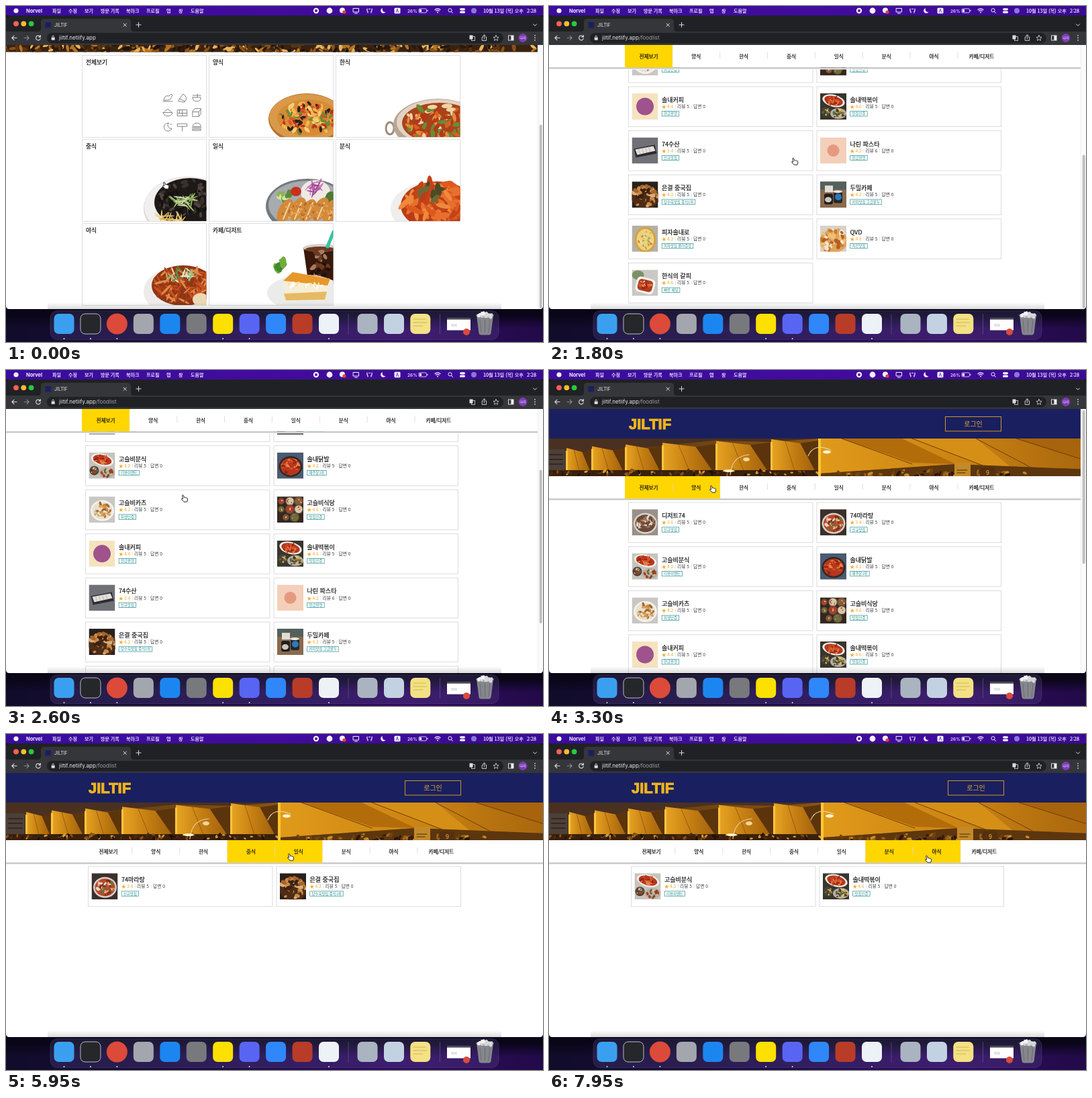
An HTML page for the animation above (8000 ms loop, 800 by 500 pixels).

```html
<!DOCTYPE html>
<html lang="ko">
<head>
<meta charset="utf-8">
<title>JILTIF</title>
<style>
html, body { margin: 0; width: 100%; height: 100%; overflow: hidden; background: #0e0a26; }
#stage { display: block; width: 800px; height: 500px; }
text { font-family: "Noto Sans CJK KR", "Noto Sans CJK JP", "Noto Sans CJK", sans-serif; white-space: pre; }
.ui { font-family: Inter, "Noto Sans CJK KR", "Noto Sans CJK JP", sans-serif; }
.logo { font-family: "Liberation Sans", Arial, sans-serif; font-weight: 700; }
.mid { text-anchor: middle; }
.med { font-weight: 500; }
</style>
</head>
<body>
<svg id="stage" viewBox="0 0 800 500"></svg>
<script>
const LOOP = 8000, TICK = 50;
const TOP = 58, VIEW = 393, TAB_W = 70.85, NAV_H = 33.5;

// Markup helpers
const rect = (x, y, w, h, fill, more = '') =>
  `<rect x="${x}" y="${y}" width="${w}" height="${h}" fill="${fill}" ${more}/>`;
const oval = (x, y, rx, ry, fill, more = '') =>
  `<ellipse cx="${x}" cy="${y}" rx="${rx}" ry="${ry}" fill="${fill}" ${more}/>`;
const path = (d, fill, more = '') => `<path d="${d}" fill="${fill}" ${more}/>`;
const line = (d, color, w = 1) =>
  path(d, 'none', `stroke="${color}" stroke-width="${w}" stroke-linecap="round" stroke-linejoin="round"`);
const text = (x, y, s, size, fill, more = '') =>
  `<text x="${x}" y="${y}" font-size="${size}" fill="${fill}" ${more}>${s}</text>`;
// Slightly heavier label
const label = (x, y, s, size, fill, cls = '', more = '') =>
  text(x, y, s, size, fill, `class="med ${cls}" stroke="${fill}" stroke-width=".2" ${more}`);
const box = (x, y, w, h, body) =>
  `<svg x="${x}" y="${y}" width="${w}" height="${h}" overflow="hidden">${body}</svg>`;
const group = (id, body) => `<g id="${id}">${body}</g>`;
const fade = (id, stops, more = '') => `<linearGradient id="${id}" ${more}>` +
  stops.map((c, i) => `<stop offset="${i / (stops.length - 1)}" stop-color="${c}"/>`).join('') +
  '</linearGradient>';

const random = seed => () => (seed = (seed * 16807) % 2147483647) / 2147483647;

// Small rotated bits spread over an ellipse
function scatter(cx, cy, rx, ry, colors, n, len, wide, seed) {
  const rnd = random(seed * 7919 + 13);
  let out = '';
  for (let i = 0; i < n; i++) {
    const a = rnd() * 6.283, r = Math.sqrt(rnd());
    const x = (cx + Math.cos(a) * r * rx).toFixed(1), y = (cy + Math.sin(a) * r * ry).toFixed(1);
    const k = 0.6 + rnd() * 0.6;
    out += oval(x, y, (len * k).toFixed(1), (wide * k).toFixed(1), colors[i % colors.length],
      `transform="rotate(${Math.floor(rnd() * 180)} ${x} ${y})"`);
  }
  return out;
}

// Shop pictures, 39 by 39
const bowl = (bg, rim, food, seed) => rect(0, 0, 39, 39, bg) + oval(20, 21, 17.5, 15.5, rim) +
  oval(20, 21, 15, 13, food[0]) + scatter(20, 21, 13, 11, food, 40, 3.2, 1.5, seed);
const spread = (bg, rim, food, seed) => {
  let out = rect(0, 0, 39, 39, bg);
  for (let i = 0; i < 8; i++) {
    const x = 6 + (i % 3) * 13 + (i > 5 ? 7 : 0), y = 7 + Math.floor(i / 3) * 12;
    const r = i % 3 ? 7 : 5, c = food[i % food.length];
    out += oval(x, y, r, r, rim) + oval(x, y, r - 1.3, r - 1.3, c) + scatter(x, y, r - 3, r - 3, food, 6, 1.5, 0.8, seed + i);
  }
  return out;
};
const duo = (bg, a, b, seed) => rect(0, 0, 39, 39, bg) +
  oval(20, 11, 17, 9, '#f2eeea', 'transform="rotate(14 20 11)"') +
  oval(20, 11, 14, 7, a[0], 'transform="rotate(14 20 11)"') + scatter(20, 11, 11, 5, a, 22, 4, 1.2, seed) +
  oval(27, 30, 12, 8, '#b8aea4') + scatter(27, 30, 9, 6, b, 30, 2.4, 1.4, seed + 1) +
  oval(8, 27, 7, 7, '#4a4039') + scatter(8, 27, 5, 5, b, 14, 2, 1.2, seed + 2);
const heap = (bg, food, seed) => rect(0, 0, 39, 39, bg) + oval(20, 23, 21, 17, food[0]) +
  scatter(20, 22, 19, 16, food, 60, 4, 2.6, seed);
const mark = (bg, dot, r) => rect(0, 0, 39, 39, bg) + oval(19.5, 19.5, r, r, dot);
const fish = () => rect(0, 0, 39, 39, '#707176') + path('M3 17L34 11 37 24 6 30Z', '#2b2c30') +
  path('M5 18L32 13 35 20 8 26Z', '#e4dfda') + line('M10 18l2 6m3-8l2 7m3-8l2 7m3-8l2 7', '#b8aca4', 0.8);
const cups = () => rect(0, 0, 39, 39, '#8a6a4c') + rect(0, 0, 39, 12, '#54605c') +
  rect(7, 6, 12, 10, '#e2ddd2') + rect(6, 18, 13, 16, '#1d1f22', 'rx="3"') + rect(20, 15, 13, 17, '#24272b', 'rx="3"') +
  oval(12, 27, 5, 4, '#d0c7ba') + oval(27, 23, 5, 5, '#2f78bd') + oval(26, 15, 7, 2, '#e9e6df');

const red = ['#b8361c', '#d9572a', '#e8864a', '#8e2414'];
const mixed = ['#7a4a2c', '#d8c3a0', '#5c6a3a', '#b23c20'];
// name, score, reviews, tag, category, picture
const shops = [
  ['디저트74', '3.6', 5, '신규맛집', 7, bowl('#9a9088', '#d9d2cb', ['#6a4a3a', '#e6dacb', '#a8785a'], 2)],
  ['74마라탕', '3.4', 5, '신규맛집', 3, bowl('#3a302c', '#d8d0c8', ['#b8482a', '#e9a98a', '#5d7a34', '#e4d8c4', '#7a2c1a'], 3)],
  ['고슬비분식', '4.2', 5, '리뷰이벤트', 5, duo('#c6c3bc', red, mixed, 4)],
  ['솔내닭발', '4.2', 5, '재주문1위', 6, bowl('#4b5a70', '#2c2826', red, 5)],
  ['고슬비카츠', '4.2', 5, '위생인증', 4, bowl('#c9c7c3', '#f4f2ee', ['#e8e0d0', '#c98a42', '#a8662a', '#d8a45c'], 6)],
  ['고슬비식당', '4.6', 5, '맛집인증', 2, spread('#35261e', '#5d4a3e', ['#b43a20', '#d8c6a6', '#8a5a34', '#6a7038'], 7)],
  ['솔내커피', '4.4', 5, '현금환영', 7, mark('#f5e3bf', '#a0528c', 13)],
  ['솔내떡볶이', '4.6', 5, '맛집인증', 5, duo('#38362c', red, ['#5a4a34', '#e8c468', '#3c3428', '#5c7038', '#d8a84a'], 8)],
  ['74수산', '3.4', 5, '신규맛집', 4, fish()],
  ['나린 파스타', '4.2', 6, '현금환영', 1, mark('#f4cfba', '#e59a80', 9)],
  ['은결 중국집', '4.2', 5, '탕수육맛집 중식1위', 3, heap('#28201c', ['#4e2c16', '#a8642a', '#c98a48', '#3c2010', '#d8b078'], 9)],
  ['두밀카페', '4.2', 5, '커피맛집 고급원두', 7, cups()],
  ['피자솔내로', '4.2', 5, '피자맛집 콜라증정', 1, rect(0, 0, 39, 39, '#b4b0a8') + oval(20, 21, 16, 19, '#d6a042') +
    oval(20, 21, 13, 16, '#ecd27c') + scatter(20, 21, 11, 14, ['#a8b05a', '#f2e4a8', '#c9883a'], 30, 2, 1.2, 10)],
  ['QVD', '4.8', 5, '치킨맛집', 6, heap('#d9d0c6', ['#e0a45a', '#c87a30', '#efc07c', '#b45f24', '#f3e6d2'], 11)],
  ['한식의 갈피', '4.6', 5, '빠른 배달', 2, rect(0, 0, 39, 39, '#c9c8c2') + oval(9, 8, 9, 7, '#7d9068') +
    rect(6, 12, 28, 23, '#f6f4ef', 'rx="6" transform="rotate(14 20 23)"') +
    rect(9, 15, 22, 17, '#b23c1e', 'rx="5" transform="rotate(14 20 23)"') + scatter(20, 23, 9, 7, [...red, '#ead2b0'], 24, 2.6, 1.3, 12)],
];

const emWidth = s => [...s].reduce((w, c) => w + (c === ' ' ? 0.224 : c < '~' ? 0.555 : 0.92), 0);

function card([name, score, reviews, tag, , pic]) {
  const grey = '#3c3c3c';
  return '<g class="card">' + rect(0.5, 0.5, 274.5, 59.5, '#fff', 'stroke="#dcdcdc"') + box(5.5, 10.5, 39, 39, pic) +
    label(50, 23.5, name, 9, '#111') +
    text(49.7, 32.6, '★', 7, '#f9a825') + text(58, 32.6, score, 6.7, '#f9a825') +
    text(73, 32.6, `리뷰 ${reviews}`, 6.7, grey) + text(97, 32.6, '답변 0', 6.7, grey) +
    line('M70.5 27.5v5M94.3 27.5v5', '#d5d5d5', 0.6) +
    rect(50.2, 37.2, emWidth(tag) * 5.4 + 5.6, 7.3, '#fff', 'stroke="#2b8f92" stroke-width=".7"') +
    text(53, 42.9, tag, 5.4, '#2b8f92') + '</g>';
}

// Home page: eight tiles
const icons = ['M-7 5h14M-6 3q1-8 8-6l3-3 2 2-2 3q0 4-5 4z', 'M-6 4L1-6q5 2 5 8l-3 4zM-4 1l8 4', 'M-6-1h12q0 6-6 6t-6-6zM-6-4h12M1-6v5',
  'M-7 0h14q-1 5-7 5t-7-5zM-5-1q5-8 10 0', 'M-7-4h14v9h-14zM-7 1h14M0-4v9M-4-4v4', 'M-6-2l3-4h9v8l-3 4h-9zM-6-1h9v6M3-1l3-4',
  'M1-6a6 6 0 1 0 5 8a5 5 0 0 1-5-8zM4-4h2', 'M-7-5h14v4h-14zM0-1v7', 'M-6-1q0-5 6-5t6 5zM-7 1h14M-6 3h12v2h-12z'];
const dishes = {
  '전체보기': () => icons.map((d, i) =>
    `<g transform="translate(${127 + (i % 3) * 21.6} ${63 + Math.floor(i / 3) * 21.6})">${line(d, '#777', 0.9)}</g>`).join(''),
  '양식': () => oval(145, 94, 57, 38, '#b8742c') + oval(145, 92, 56, 35, '#d9994a') + oval(147, 92, 46, 27, '#d98a34') +
    scatter(147, 92, 43, 24, ['#c0301c', '#f2cf72', '#d9542a', '#2c2218', '#6f8a34', '#f0b850'], 120, 4.5, 2.2, 21),
  '한식': () => oval(80, 108, 6, 9, 'none', 'stroke="#a08c7c" stroke-width="3"') + oval(152, 103, 67, 39, '#b9a594') +
    oval(153, 99, 63, 34, '#e3d3c2') + oval(154, 100, 56, 30, '#a8431c') +
    scatter(154, 100, 50, 26, ['#d8601f', '#f0d3a4', '#b0381a', '#e58a3a', '#6c8a34'], 80, 7, 3, 22),
  '중식': () => oval(157, 102, 66, 47, '#d9d8d6') + oval(157, 100, 65, 44, '#f1f0ee') + oval(160, 93, 53, 36, '#1e1816') +
    scatter(160, 88, 48, 28, ['#38302c', '#15100f', '#4c443e'], 70, 5, 2.5, 23) +
    scatter(130, 117, 24, 7, ['#d8b45c', '#efd58a'], 24, 9, 1, 24) +
    scatter(152, 92, 17, 9, ['#a9c77a', '#d5e2ae', '#7fa350'], 26, 9, 1, 25),
  '일식': () => oval(146, 99, 62, 41, '#74797e') + oval(146, 97, 58, 36, '#a7abae') + oval(158, 78, 22, 18, '#efe9e2') +
    scatter(112, 85, 11, 8, ['#8db552', '#d3e2a4', '#5d8a3a'], 9, 6, 4, 26) + oval(129, 77, 8, 7, '#c8301f') +
    scatter(158, 70, 13, 9, ['#a03f92', '#c778b8'], 22, 8, 0.9, 27) + oval(181, 90, 9, 13, '#4d7a34') +
    [0, 1, 2, 3, 4].map(i => oval(113 + i * 17, 106 - (i % 2) * 3, 10, 19, '#d3893a', `transform="rotate(28 ${113 + i * 17} 106)"`) +
      line(`M${120 + i * 17} 94l-10 24`, '#f2d39a', 2)).join('') + scatter(147, 107, 42, 13, ['#b8692a', '#e6ab58'], 60, 2.4, 1.3, 28),
  '분식': () => oval(148, 103, 67, 41, '#efeeec') + oval(151, 98, 55, 36, '#b93c16') +
    scatter(150, 94, 48, 27, ['#dd5a1e', '#ef8a3c', '#c3421a', '#e8702c'], 58, 13, 4, 29) +
    scatter(146, 78, 24, 12, ['#4a4a26', '#6c6a34'], 7, 9, 4, 30),
  '야식': () => oval(150, 101, 59, 38, '#eeecea') + oval(150, 92, 47, 30, '#8e3616') +
    scatter(150, 91, 42, 25, ['#c8521f', '#a83c18', '#e08a44'], 80, 9, 1.6, 31) +
    scatter(148, 76, 19, 9, ['#9fb878', '#e6ead0', '#5f8a42'], 26, 8, 1.1, 32) +
    oval(176, 113, 12, 10, '#ecd9b4'),
  '카페/디저트': () => path('M140 35H190L184 92H148Z', '#38180c') + oval(165, 36, 25, 6, '#d5cfca') + oval(165, 38, 22, 4, '#6c3a20') +
    scatter(164, 62, 15, 20, ['#6c3a22', '#20100a', '#a87a60'], 24, 5, 3, 33) + line('M176 34l9-22', '#35c4a0', 5) +
    oval(143, 103, 57, 27, '#ebebe9') + path('M110 85L124 72 180 82 173 111 114 114Z', '#f7eed8') +
    path('M110 85L124 72 180 82 176 92Z', '#e8982a') + path('M111 104L175 101 172 113 114 114Z', '#e6ba62') +
    scatter(142, 92, 28, 4, ['#fffaf0', '#f4e3b8'], 16, 4, 2, 34) +
    scatter(105, 62, 9, 7, ['#3f8a2c', '#6fae3c', '#2c6e24'], 8, 8, 4, 35),
};
const labels = ['전체보기', '양식', '한식', '중식', '일식', '분식', '야식', '카페/디저트'];

const home = () => rect(0, TOP, 800, VIEW, '#fff') +
  box(0, TOP, 800, 10.5, rect(0, 0, 800, 11, '#3a220f') +
    scatter(400, 5, 420, 7, ['#8a5216', '#1f120a', '#b8741e', '#5c3410', '#e8b45c', '#2a180c'], 260, 6, 2.4, 41)) +
  labels.map((name, i) => {
    const x = 113 + (i % 3) * 189, y = 74 + Math.floor(i / 3) * 125;
    return rect(x + 0.5, y - 0.5, 185, 122, '#fff', 'stroke="#dedede"') + box(x + 1, y, 184.5, 121, dishes[name]()) +
      label(x + 6, y + 13.3, name, 8.7, '#111');
  }).join('');

// Banner of lit tents
function banner() {
  const posts = [30, 68, 118, 173, 253, 335, 405];
  const sails = posts.slice(0, -1).map((x, i) => {
    const w = posts[i + 1] - x, y = 14 - i * 2.6;
    return path(`M${x} ${y}L${x + w * 0.62} ${y + 6}L${x + w * 0.95} 50H${x}Z`, 'url(#sail)') +
      path(`M${x + w * 0.62} ${y + 6}L${x + w} ${y + 2}V50H${x + w * 0.95}Z`, '#5c340c') +
      line(`M${x + w * 0.3} ${y + 3}L${x + w * 0.5} 48`, '#8a5410', 0.8) + rect(x - 1, y + 4, 3, 46 - y, '#ffc440');
  }).join('');
  return box(-4, 102, 808, 56, rect(0, 0, 808, 56, 'url(#tent)') +
    path('M0 0H405L335 5 250 3 120 16 0 22Z', '#4a3020') + rect(0, 16, 28, 40, '#4c4038') +
    line('M4 24h20M4 31h20M4 38h20', '#332821', 2) + sails +
    rect(0, 47, 405, 9, '#3a200c') + scatter(200, 51, 210, 4, ['#1e1008', '#8a5016', '#d89a34', '#4a2c0e'], 90, 3, 1.6, 51) +
    path('M408 0H808V46L610 38 408 52Z', 'url(#canopy)') + path('M440 0L545 36 610 38 530 0Z', '#b36c0a') +
    path('M545 0L650 40 690 41 640 0Z', '#d68f16') + path('M700 0L808 34V0Z', '#a8640c') +
    line('M440 0l105 38M545 0l105 40M640 0l80 42M700 0l108 34', '#6c3e0a', 1) +
    path('M408 52L610 38 808 46V56H408Z', '#5c360e') +
    scatter(570, 52, 150, 4, ['#2c1608', '#9a6218', '#70420e', '#c88a2c'], 70, 4, 2, 52) +
    rect(405, 0, 4, 56, '#ffc632') + line('M274 54Q276 26 302 24M390 26Q398 6 424 17', '#e6cf9e', 1.2) +
    oval(272, 48, 8, 2, '#fff0c0') + oval(298, 31, 5, 3, '#f2d596') + oval(418, 20, 6, 2.5, '#fff3cc') +
    rect(608, 36, 24, 20, '#c48a28') + line('M612 47h15M612 51h12', '#4a2c0c', 1.2) + rect(646, 43, 22, 13, '#54300e') +
    text(655, 54, '9', 9, '#f0bd48'));
}

const listPage = () => rect(0, TOP, 800, VIEW, '#fff') +
  group('body', rect(-8, TOP, 816, 44, '#1a1f5f') +
    text(119, 88, 'JILTIF', 22, '#efb41c', 'class="logo" stroke="#efb41c" stroke-width="1"') +
    rect(590.5, 69.5, 83, 21.5, 'none', 'stroke="#c8982a"') +
    text(632, 83.8, '로그인', 10, '#e0aa2c', 'class="mid med"') + banner() + shops.map(card).join('')) +
  group('nav', rect(-8, 0, 816, NAV_H, '#fff') + rect(-8, NAV_H, 816, 3, 'url(#shade)') +
    labels.map((s, i) => rect(113 + i * TAB_W, 0, TAB_W + 0.2, NAV_H, '#ffd600', 'class="hot"')).join('') +
    labels.map((s, i) => (i ? line(`M${113 + i * TAB_W} 11v9`, '#d8d8d8', 0.8) : '') +
      label(113 + (i + 0.5) * TAB_W, 20.3, s, 7.6, '#111', 'mid')).join(''));

// Desktop, window frame and dock
const menu = () => {
  const items = [['파일', 69], ['수정', 93], ['보기', 117], ['방문 기록', 141], ['북마크', 179], ['프로필', 209], ['탭', 239], ['창', 257], ['도움말', 275]];
  const w = '#f4f0ff';
  return rect(0, 0, 800, 14, 'url(#bar)') + oval(15, 7, 3.6, 3.6, w) +
    text(30, 9.6, 'Norvel', 7.4, w, 'class="ui" font-weight="700"') +
    items.map(([s, x]) => label(x, 9.5, s, 7, w)).join('') +
    oval(462, 7, 4.2, 4.2, w) + rect(460.3, 5.3, 3.4, 3.4, '#40109c') + oval(482, 7, 4.4, 4.4, w) +
    oval(501, 6.5, 4, 4, w) + oval(504, 9, 2.6, 2.6, '#e0412f') +
    line('M517.5 3.5h8v5.5h-8zM519.5 11h4', w, 1) + line('M538 4v3q0 1 1 1v2M545 4v3q0 1-1 1v2M540.5 4.5h2', w, 1.2) +
    path('M561 3a4 4 0 1 0 4.5 6a4.2 4.2 0 0 1-4.5-6z', w) + rect(578.5, 2.8, 9, 8.4, w, 'rx="1.5"') +
    text(583, 9.6, 'A', 7, '#40109c', 'class="ui mid"') + text(598, 9.5, '26%', 6.6, w, 'class="ui med"') +
    rect(615, 4, 11.5, 6, 'none', `rx="1.6" stroke="${w}" stroke-width=".8"`) + rect(616, 5, 3, 4, w) + rect(627.4, 5.8, 1, 2.4, w) +
    line('M639 5.5q4-3.4 8 0M640.6 7.4q2.4-2 4.8 0', w, 1.2) + oval(643, 9.5, 1, 1, w) +
    oval(661.5, 6.3, 2.6, 2.6, 'none', `stroke="${w}"`) + line('M663.5 8.5l2 2', w) +
    rect(676, 3.2, 8, 3.2, w, 'rx="1.6"') + rect(676, 7.6, 8, 3.2, w, 'rx="1.6"') + oval(697, 7, 4, 4, '#8a78d8') +
    label(711, 9.6, '10월 13일 (목) 오후', 7.2, w) + label(790, 9.6, '2:28', 7.2, w, '', 'text-anchor="end"');
};

const frame = () => {
  const g = '#dadce0';
  return path(`M0 ${TOP}V19q0-5 5-5H795q5 0 5 5V${TOP}Z`, '#202124') +
    path('M47 38q5 0 5-4V24q0-5 5-5H181q5 0 5 5v10q0 4 5 4z', '#35363a') + rect(0, 38, 800, 20, '#35363a') +
    ['#ff5f57', '#febc2e', '#28c840'].map((c, i) => oval(15 + i * 11.3, 26.3, 3.9, 3.9, c)).join('') +
    rect(58.5, 24, 8.5, 8.5, '#1b1f60') + text(72, 30.8, 'JILTIF', 7, '#e8eaed', 'class="ui"') +
    line('M175 26l4.4 4.4M179.4 26l-4.4 4.4M194 28h7M197.5 24.5v7M785.5 27l2.5 2.5 2.5-2.5', g) +
    rect(61, 40, 680, 15.4, '#202124', 'rx="7.7"') +
    line('M16 47.5h-7M12 44.3l-3.2 3.2 3.2 3.2', g, 1.1) + line('M27 47.5h7M31 44.3l3.2 3.2-3.2 3.2', '#85878b', 1.1) +
    line('M51 45.8a3.4 3.4 0 1 0 .3 2.6M51.4 43.5v2.6h-2.6', g, 1.1) +
    rect(67.7, 46.8, 5, 4, g, 'rx=".6"') + line('M68.9 46.5v-1a1.3 1.3 0 0 1 2.6 0v1', g, 0.9) +
    `<text class="ui" x="79" y="50.4" font-size="8" fill="#e8eaed">jiltif.netlify.app<tspan id="route" fill="#9aa0a6">/foodlist</tspan></text>` +
    rect(690.5, 43.5, 5, 6, g) + rect(693.5, 45.5, 5, 6, 'none', `stroke="${g}" stroke-width=".8"`) +
    line('M710.5 46h-1.3v5.4h6.4v-5.4h-1.3M712.4 49v-6M710.6 44.6l1.8-1.8 1.8 1.8', g, 0.9) +
    line('M730 43.5l1.2 2.7 2.9.3-2.2 2 .6 2.9-2.5-1.5-2.5 1.5.6-2.9-2.2-2 2.9-.3z', g, 0.8) +
    rect(748.5, 44, 7.5, 7, 'none', `stroke="${g}"`) + rect(752.5, 44, 3.5, 7, '#fff') +
    oval(770, 47.5, 6.4, 6.4, '#7d3bb8') + text(770, 49.3, '나라', 4.8, '#fff', 'class="mid"') +
    [43.8, 47.3, 50.8].map(y => oval(788, y, 0.9, 0.9, g)).join('');
};

const desk = () => rect(0, 440, 800, 60, 'url(#desk)') +
  rect(0, 440, 800, 40, 'url(#under)');

const dock = () => {
  const apps = ['#3b9ff0', '#25272a', '', '#a3a6ad', '#1c86f0', '#77797d', '#fbe000', '#5865f2', '#2f87fa', '#b83c28', '#edf2f7'];
  const at = i => 86.5 + i * 39.45;
  const tile = (x, c, more = '') => rect(x - 15, 458, 30, 30, c, `rx="7" ${more}`);
  return rect(66, 453.5, 668, 43, '#6a5aa8', 'rx="10" fill-opacity=".22" stroke="#9c8cd0" stroke-opacity=".25" stroke-width=".7"') +
    apps.map((c, i) => c ? tile(at(i), c, i === 1 ? 'stroke="#b8bac0" stroke-width="1"' : '') :
      oval(at(i), 473, 15.5, 15.5, '#dc4a3a')).join('') +
    [0, 1, 2, 6, 7, 10].map(i => oval(at(i), 495, 1, 1, '#e6e0f4')).join('') +
    line('M510 459v29M646.5 459v29', '#64548f', 0.7) + tile(538.5, '#aab4c0') + tile(578, '#c3d2e2') + tile(617.3, '#f3e184') +
    line('M607 466h18M607 471h20M607 476h14', '#c9b24c', 0.9) +
    rect(657, 464.5, 35, 18, '#fff') + rect(657, 464.5, 35, 2, '#35363a') + rect(663, 473, 9, 4, '#e4e4e8') + oval(686, 485, 5, 5, '#dc4a3a') +
    path('M701 460H726L722.5 487q-.3 2.4-3 2.4h-12q-2.7 0-3-2.4z', '#85878d') +
    oval(713.5, 460.5, 13, 3.4, '#b4b6ba') + scatter(713.5, 460, 10, 3, ['#f4f4f4', '#d6d8da'], 12, 4, 2.4, 61) +
    line('M706 467l2 19M713.5 467v19M721 467l-2 19', '#64666c', 0.8);
};

const hand = 'M-3.4-4.3q.7-1.5 1.7-.2l1.3 3.3q1-.7 1.7.1 1-.5 1.6.4 1.3-.2 1.6 1.2.5 2.4-.8 4.7h-4.7l-3.3-3.5q-.6-1.5 1-1.3l1 .6z';

document.getElementById('stage').innerHTML = '<defs>' +
  fade('bar', ['#3a0ca0', '#420c9e', '#3a0a94']) + fade('desk', ['#110c2a', '#180c38', '#220d4c', '#320b5e', '#220a48']) +
  fade('tent', ['#3a2a22', '#6a4214', '#8a5512', '#a8680e', '#7a4a10']) +
  fade('sail', ['#e8a423', '#c47e12', '#a0600e']) + fade('canopy', ['#e09a1a', '#cc8412', '#a8660e']) +
  fade('shade', ['#a8a8a8', '#fff'], 'x2="0" y2="1"') +
  fade('under', ['#0a0618', '#0a0618', '#0a061800'], 'x2="0" y2="1"') +
  fade('glow', ['#00000000', '#00000024'], 'x2="0" y2="1"') +
  `<clipPath id="page"><path d="M0 ${TOP}H800V446q0 5-5 5H5q-5 0-5-5Z"/></clipPath></defs>` +
  rect(0, 0, 800, 500, '#12092e') + menu() + desk() + frame() +
  `<g clip-path="url(#page)">` + group('home', home()) + group('list', listPage()) +
  group('bar-v', rect(792, TOP, 8, VIEW, '#fafafa') + line('M792.3 58v393', '#e6e6e6', 0.6) +
    rect(794.7, 0, 4, 10, '#bfbfbf', 'rx="2" id="thumb"')) + rect(62, 441, 676, 10, 'url(#glow)') + '</g>' + dock() +
  group('hand', path(hand, '#fff', 'stroke="#111" stroke-width=".9" stroke-linejoin="round"'));

// Timeline
const pages = [[0, -1], [600, 0], [3650, 1], [4650, 2], [5500, 3], [6200, 4], [7000, 5]];
const scrolls = [[0, 165.5], [1000, 165.5], [1400, 274], [2250, 274], [2500, 183.5], [3050, 0]];
const moves = [[0, 238, 267], [50, 238, 267], [400, 240, 150], [600, 240, 150], [950, 433, 258], [1500, 433, 258],
  [2250, 266, 191], [3100, 266, 191], [3300, 244, 177], [4000, 244, 177], [4350, 299, 179], [5000, 299, 179],
  [5400, 365, 181], [5800, 375, 181], [5950, 424, 183], [6050, 438, 183], [6650, 438, 183], [6850, 506, 184],
  [7800, 506, 184], [7950, 565, 186]];

function valueAt(keys, t, col) {
  const i = keys.findIndex(k => k[0] > t);
  if (i < 0) return keys[keys.length - 1][col];
  const a = keys[i - 1], b = keys[i];
  return a[col] + (b[col] - a[col]) * (t - a[0]) / (b[0] - a[0]);
}

const $ = id => document.getElementById(id);
const cards = [...document.querySelectorAll('.card')];
const hots = [...document.querySelectorAll('.hot')];
const show = (el, on) => el.setAttribute('display', on ? 'inline' : 'none');
const shift = (el, x, y) => el.setAttribute('transform', `translate(${x} ${y})`);

function draw(t) {
  const page = pages.filter(p => p[0] <= t).pop()[1];
  const long = page < 1, dx = long ? 0 : 4;
  const scroll = long ? valueAt(scrolls, t, 1) : 0;
  const x = valueAt(moves, t, 1), y = valueAt(moves, t, 2);
  show($('home'), page < 0);
  show($('list'), page >= 0);
  show($('route'), page >= 0);
  show($('bar-v'), long);
  shift($('hand'), x, y);

  const total = page < 0 ? 558.5 : 667;
  $('thumb').setAttribute('y', TOP + 2 + scroll * VIEW / total);
  $('thumb').setAttribute('height', VIEW * VIEW / total - 3);
  if (page < 0) return;

  let n = 0;
  cards.forEach((el, i) => {
    const on = !page || shops[i][4] === page;
    show(el, on);
    if (on) shift(el, 118 + (n % 2) * 280.5, 196.7 + Math.floor(n++ / 2) * 65.6);
  });
  const navY = Math.max(TOP, 158 - scroll);
  shift($('body'), dx, -scroll);
  shift($('nav'), dx, navY);
  const tipY = y - 5 - navY;
  const over = tipY >= 0 && tipY < NAV_H ? Math.floor((x - 2 - 113 - dx) / TAB_W) : -1;
  hots.forEach((el, i) => show(el, i === page || i === over));
}

const start = performance.now();
function loop() {
  const t = (performance.now() - start) % LOOP;
  draw(Math.floor(t / TICK) * TICK);
  requestAnimationFrame(loop);
}
draw(0);
requestAnimationFrame(loop);
</script>
</body>
</html>
```
